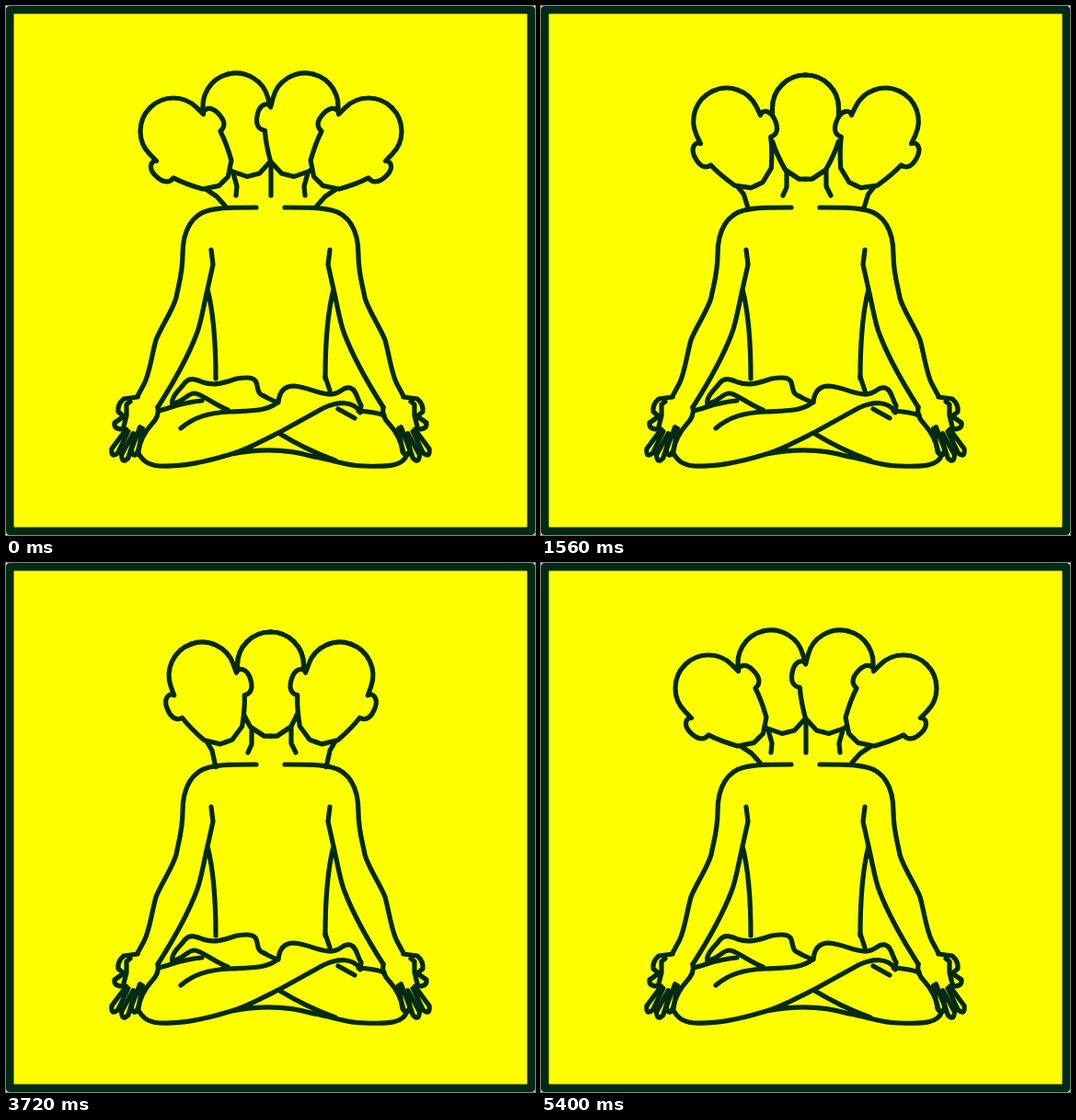
Recreate the animation shown at these times as an HTML page with a canvas. Size 575x575 px, loop 5.52 s.

```html
<!DOCTYPE html>
<html lang="en">
<head>
<meta charset="utf-8">
<title>Meditation</title>
<style>
html, body { margin: 0; width: 100%; height: 100%; overflow: hidden; background: #fff; }
canvas { display: block; }
</style>
</head>
<body>
<canvas id="stage" width="575" height="575"></canvas>
<script>
const SIZE = 575, STEP = 120, STEPS = 46;
const INK = '#022a14', PAPER = '#ff0';
const ctx = document.getElementById('stage').getContext('2d');

// The left half of a head around the middle of its skull.
const halfHead = new Path2D(`M0 -36 A36 36 0 0 0 -36 0 L-36 10
  C-40 5 -48 9 -48 20 C-48 31 -44 37 -36 36 C-32 49 -27 58 -22 67 L-7 77 L0 77`);

const arm = new Path2D(`M272 219 C248 219 233 219 221 222 C203 226 192 243 192 270
  C192 291 187 305 185 317 C181 331 168 350 163 363 C159 377 156 400 150 411 L143 424
  M223 265 L225 281 L219 308 C214 329 212 345 207 357 C199 378 188 400 165 436
  M219 308 C226 335 228 370 228 405`);

const palm = new Path2D(`M143 425 L128 427 Q121 433 122 441 L128 446 L118 453 Q117 460 126 460
  M135 430 L131 433 L131 445 L128 457
  M165 436 Q167 446 158 455 Q147 467 143 485`);

const finger = new Path2D('M0 -27 L-4 -1 Q0 9 4 0 L3 -26');

const feet = new Path2D(`M347 403 L352 418
  M181 434 C178 425 190 416 194 410 C200 403 206 406 214 409 C228 414 240 408 251 405
  C264 403 272 403 273 413 C275 425 279 422 284 426 L295 431
  M183 432 C196 428 197 421 205 421 C212 421 225 433 241 439
  M296 431 C297 419 303 413 313 413 C328 414 342 423 354 422
  C366 421 364 414 374 415 C382 418 381 427 386 434 L385 442`);

const legs = new Path2D(`M295 431 C283 441 265 440 244 441 C220 442 204 447 190 459
  M166 440 C184 435 195 430 213 429
  M384 440 C377 430 362 429 345 437 L298 463 C270 477 255 485 238 489
  C208 498 188 501 167 500 C151 499 147 491 143 485
  M361 438 L379 448 M383 440 Q400 441 411 445
  M296 464 C314 475 333 485 358 494
  M245 487 C280 480 312 483 335 490 C358 494 371 500 390 500 C417 501 432 500 436 487`);

const clamp = (v, max = 1) => Math.min(max, Math.max(0, v));

function mirrored(draw, axis = SIZE / 2) {
  ctx.save();
  ctx.translate(2 * axis, 0);
  ctx.scale(-1, 1);
  draw();
  ctx.restore();
}

function bothSides(draw, axis) {
  draw();
  mirrored(draw, axis);
}

function trace(points) {
  ctx.beginPath();
  for (const [x, y] of points) ctx.lineTo(x, y);
}

function line(points) {
  trace(points);
  ctx.stroke();
}

function drawHead(x, y, degrees) {
  ctx.save();
  ctx.translate(x, y);
  ctx.rotate(degrees * Math.PI / 180);
  bothSides(() => ctx.fill(halfHead), 0);
  bothSides(() => ctx.stroke(halfHead), 0);
  ctx.restore();
}

// Outer heads slide away first and tip over late.
function drawOuter(p) {
  const tip = p ** 1.8;
  const x = 288 - 106 * p ** .92 - 130 * p ** 5 * (1 - p);
  const y = 111 + 25 * tip;
  const a = tip * Math.PI / 4, c = Math.cos(a), s = Math.sin(a);
  const endX = x - 18 + 74 * tip, endY = 215 + 6 * Math.sin(Math.PI * p) + 2 * p;
  const neck = [
    [x - 20 * c + 68 * s, y + 20 * s + 68 * c],
    [endX - 9 * tip, 198 + 9 * p],
    [endX, endY]
  ];
  trace([...neck, [endX + 26 * (1 - p), endY], [x + 75 * s, y + 75 * c]]);
  ctx.fill();
  line(neck);
  drawHead(x, y, -45 * tip);
}

const drawInner = p => drawHead(287.5 + 37.5 * p, 111 - 2 * p, 14 * p);

const nearNeck = p => line([[267 + 20 * p, 178 - 10 * p], [267 + 20 * p, 197], [263 + 24 * p, 206]]);
const farNeck = p => line([[310 + 19 * p * p, 178], [310 + 14 * p * p, 196], [315 + 10 * p * p, 206]]);

function drawInnerNecks(left, right) {
  farNeck(right);
  if (right < .3) nearNeck(right);
  else mirrored(() => {
    farNeck(left);
    nearNeck(left);
  });
}

function drawHand() {
  ctx.stroke(palm);
  for (let i = 0; i < 3; i++) {
    ctx.save();
    ctx.translate(118 + 11 * i, 484 + 6 * Math.sin(i * Math.PI / 2));
    ctx.rotate((28 - 8 * i) * Math.PI / 180);
    ctx.stroke(finger);
    ctx.restore();
  }
}

function drawFrame() {
  ctx.clearRect(0, 0, SIZE, SIZE);
  ctx.fillStyle = INK;
  ctx.beginPath();
  ctx.roundRect(0, 0, SIZE, SIZE, 4);
  ctx.fill();
  ctx.fillStyle = PAPER;
  ctx.fillRect(8.5, 8.5, SIZE - 17, SIZE - 17);
}

function render(step) {
  // Each part gathers in the middle, rests, then spreads again.
  const left = clamp(Math.max(6 - step, step - 39) / 6);
  const right = clamp(Math.max(10 - step, step - 35) / 6);
  const outer = clamp(Math.max(21 - step, step - 24) / 11);

  drawFrame();
  ctx.strokeStyle = INK;
  ctx.lineWidth = 5.2;
  ctx.lineCap = ctx.lineJoin = 'round';

  drawInnerNecks(left, right);
  mirrored(() => drawInner(left));
  drawInner(right);
  bothSides(() => drawOuter(outer), 288);

  bothSides(() => ctx.stroke(arm));
  bothSides(drawHand);
  ctx.stroke(feet);
  ctx.stroke(legs);
}

function tick() {
  render(Math.floor(performance.now() / STEP) % STEPS);
  requestAnimationFrame(tick);
}
tick();
</script>
</body>
</html>
```
